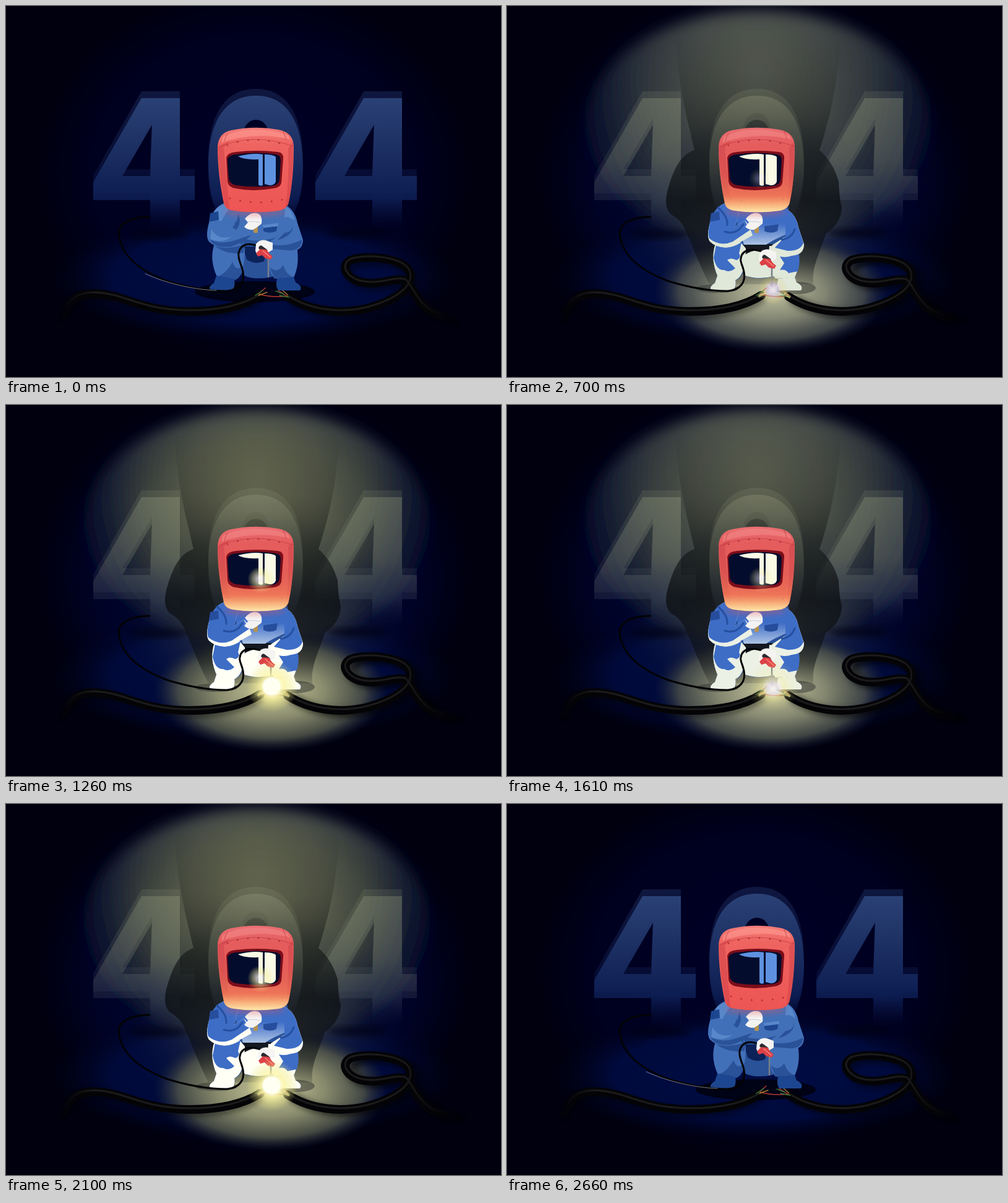
An HTML page for the animation above (3290 ms loop, 800 by 600 pixels).

```html
<!DOCTYPE html>
<html lang="en">
<head>
<meta charset="utf-8">
<title>404</title>
<style>
html, body { margin: 0; width: 100%; height: 100%; overflow: hidden; background: #00000f; }
svg { display: block; width: 100%; height: 100%; }
.line { fill: none; stroke-linecap: round; stroke-linejoin: round; }
.base { fill: #4270b8; }
.shade { fill: #2a5299; }
.pale { fill: #5887ca; }
.deep { fill: #0c2259; }
.boot { fill: #1d4690; }
.white { fill: var(--white); }
.blue { fill: #3e6dc6; }
</style>
</head>
<body>
<svg viewBox="0 0 800 600" role="img" aria-label="404">
<defs>
  <radialGradient id="room"><stop stop-color="#000027"/><stop offset=".75" stop-color="#00001f"/><stop offset="1" stop-color="#00000f"/></radialGradient>
  <radialGradient id="floor"><stop stop-color="#000c44"/><stop offset=".7" stop-color="#000a3c"/><stop offset="1" stop-color="#000520" stop-opacity="0"/></radialGradient>
  <radialGradient id="wall" gradientUnits="userSpaceOnUse" cx="0" cy="0" r="300" gradientTransform="translate(405 120) scale(1 1.2)"><stop stop-color="#5b5f54"/><stop offset=".35" stop-color="#464b48"/><stop offset=".6" stop-color="#2f363c"/><stop offset=".82" stop-color="#141c31"/><stop offset="1" stop-color="#030b2a" stop-opacity=".6"/></radialGradient>
  <radialGradient id="mid"><stop stop-color="#5a5e55" stop-opacity=".75"/><stop offset=".55" stop-color="#333a45" stop-opacity=".45"/><stop offset="1" stop-color="#0a1438" stop-opacity="0"/></radialGradient>
  <radialGradient id="pool"><stop stop-color="#c4c4a2"/><stop offset=".45" stop-color="#828572"/><stop offset=".78" stop-color="#474c4a" stop-opacity=".85"/><stop offset="1" stop-color="#141c34" stop-opacity="0"/></radialGradient>
  <radialGradient id="warm"><stop stop-color="#d8d690" stop-opacity=".3"/><stop offset=".7" stop-color="#8c8c40" stop-opacity=".15"/><stop offset="1" stop-color="#606020" stop-opacity="0"/></radialGradient>
  <radialGradient id="flare"><stop stop-color="#fff"/><stop offset=".3" stop-color="#fffde0"/><stop offset=".46" stop-color="#fcf6a4" stop-opacity=".75"/><stop offset="1" stop-color="#e9e27a" stop-opacity="0"/></radialGradient>
  <radialGradient id="ember"><stop stop-color="#fff"/><stop offset=".35" stop-color="#dccdf5" stop-opacity=".85"/><stop offset=".65" stop-color="#e6dc90" stop-opacity=".4"/><stop offset="1" stop-color="#d8d080" stop-opacity="0"/></radialGradient>
  <linearGradient id="front" gradientUnits="userSpaceOnUse" x1="0" y1="145" x2="0" y2="362"><stop stop-color="#2b4276"/><stop offset=".5" stop-color="#1a2d61" stop-opacity=".92"/><stop offset=".76" stop-color="#10245d" stop-opacity=".75"/><stop offset="1" stop-color="#06123e" stop-opacity="0"/></linearGradient>
  <linearGradient id="glow" gradientUnits="userSpaceOnUse" x1="0" y1="145" x2="0" y2="358"><stop stop-color="#a9ae8c" stop-opacity=".27"/><stop offset=".5" stop-color="#949b84" stop-opacity=".24"/><stop offset=".8" stop-color="#5a6678" stop-opacity=".2"/><stop offset="1" stop-color="#304070" stop-opacity="0"/></linearGradient>
  <linearGradient id="cast" gradientUnits="userSpaceOnUse" x1="0" y1="45" x2="0" y2="455"><stop stop-color="#10130f" stop-opacity="0"/><stop offset=".25" stop-color="#10130f" stop-opacity=".22"/><stop offset=".45" stop-color="#0b0e0e" stop-opacity=".5"/><stop offset=".65" stop-color="#0a0d10" stop-opacity=".75"/><stop offset=".9" stop-color="#0b0e12" stop-opacity=".5"/><stop offset="1" stop-color="#0b0e12" stop-opacity=".1"/></linearGradient>
  <linearGradient id="rubber" gradientUnits="userSpaceOnUse" x1="80" y1="0" x2="730" y2="0"><stop stop-color="#040407" stop-opacity="0"/><stop offset=".06" stop-color="#040407"/><stop offset=".92" stop-color="#040407"/><stop offset="1" stop-color="#040407" stop-opacity="0"/></linearGradient>
  <linearGradient id="sheen" gradientUnits="userSpaceOnUse" x1="95" y1="0" x2="710" y2="0"><stop stop-color="#1b1b1b" stop-opacity="0"/><stop offset=".08" stop-color="#1b1b1b"/><stop offset=".88" stop-color="#1b1b1b"/><stop offset="1" stop-color="#1b1b1b" stop-opacity="0"/></linearGradient>
  <linearGradient id="mask" x1="0" y1="0" x2="0" y2="1"><stop stop-color="#f47d7a"/><stop offset=".2" stop-color="#ee6460"/><stop offset="1" stop-color="#ed5553"/></linearGradient>
  <linearGradient id="chin" x1="0" y1="0" x2="0" y2="1"><stop stop-color="#b52a50" stop-opacity=".16"/><stop offset=".5" stop-color="#d05a50" stop-opacity=".25"/><stop offset=".8" stop-color="#ee8258" stop-opacity=".65"/><stop offset=".9" stop-color="#f8b67c" stop-opacity=".9"/><stop offset="1" stop-color="#ffeaac"/></linearGradient>
  <linearGradient id="torso" gradientUnits="userSpaceOnUse" x1="0" y1="352" x2="0" y2="390"><stop stop-color="#3e6dc6"/><stop offset="1" stop-color="#b9cce8"/></linearGradient>
  <filter id="soft" x="-30%" y="-30%" width="160%" height="160%"><feGaussianBlur stdDeviation="4"/></filter>
  <filter id="haze" x="-30%" y="-30%" width="160%" height="160%"><feGaussianBlur stdDeviation="11"/></filter>
  <path id="four" fill-rule="evenodd" d="M219 149H281V275H305V314H281V368H233V314H141V285ZM236 192L188 275H233Z"/>
  <path id="zero" fill-rule="evenodd" d="M404 145C457 145 480 192 480 260S457 372 404 372 327 328 327 260 351 145 404 145ZM404 184C384 184 377 210 377 260S384 333 404 333 431 310 431 260 424 184 404 184Z"/>
  <g id="digits"><use href="#four"/><use href="#zero"/><use href="#four" x="359"/></g>
  <path id="shell" d="M342 228C343 212 350 204 364 201Q402 193 440 200C456 203 464 211 465 226C465 260 463 290 457 317Q455 328 441 331Q402 336 368 331Q354 329 352 319C346 290 342 260 342 228Z"/>
  <path id="cord" d="M92 500C100 480 111 464 145 465C195 468 215 492 290 494C345 495 384 485 411 468"/>
  <path id="loop" d="M455 470C492 494 540 499 583 489C625 478 662 457 652 429C640 407 582 402 557 411C540 420 549 439 572 446C605 454 626 438 646 444C661 458 668 501 722 503"/>
  <path id="leftLeg" d="M337 384Q328 410 341 438L370 443Q386 435 386 392L374 378Z"/>
  <path id="rightLeg" d="M424 388L470 389Q475 418 465 439L434 441Q420 425 424 388Z"/>
  <path id="leftBoot" d="M340 436L369 441Q371 453 366 460H331Q325 455 336 448Z"/>
  <path id="rightBoot" d="M438 441L465 438L468 447Q480 453 475 460H440Q435 453 438 441Z"/>
  <path id="leftArm" d="M352 319Q337 325 330 344Q321 372 328 381Q341 394 364 389L397 371Q390 350 384 347L368 358L376 329Z"/>
  <path id="rightArm" d="M450 321Q467 329 471 351L480 378Q480 393 466 396Q450 400 431 393L428 380Q444 370 450 366Z"/>
</defs>

<rect width="800" height="600" fill="#00000f"/>
<ellipse cx="400" cy="270" rx="350" ry="300" fill="url(#room)"/>
<ellipse cx="400" cy="438" rx="325" ry="105" fill="url(#floor)"/>

<g class="lit">
  <ellipse cx="404" cy="290" rx="340" ry="270" fill="url(#floor)" opacity=".35"/>
  <ellipse cx="406" cy="195" rx="278" ry="188" fill="url(#wall)" filter="url(#haze)"/>
  <ellipse cx="412" cy="350" rx="225" ry="175" fill="url(#mid)"/>
  <ellipse cx="428" cy="462" rx="192" ry="99" fill="url(#pool)"/>
  <g class="warm">
    <ellipse cx="408" cy="175" rx="250" ry="172" fill="url(#warm)"/>
    <ellipse cx="430" cy="462" rx="185" ry="97" fill="url(#warm)"/>
  </g>
</g>

<g fill="#000008" opacity=".55" filter="url(#soft)">
  <ellipse cx="248" cy="369" rx="46" ry="7"/>
  <ellipse cx="567" cy="367" rx="46" ry="7"/>
</g>
<g class="dark" fill="url(#front)">
  <use href="#digits" y="-11" opacity=".36"/>
  <use href="#digits"/>
</g>
<g class="lit">
  <g fill="url(#glow)">
    <use href="#digits" y="-11" opacity=".5"/>
    <use href="#digits"/>
  </g>
  <path fill="url(#cast)" d="M272 45C276 130 292 185 303 233C278 241 267 270 259 300Q253 326 265 337Q285 348 291 369C303 395 313 423 327 450H495C492 421 506 399 515 369Q541 351 541 325Q537 310 536 284Q527 252 505 233C523 180 535 120 540 45Z"/>
  <g fill="url(#glow)" opacity=".45"><use href="#zero"/><use href="#zero" y="-11" opacity=".5"/></g>
</g>

<ellipse class="dark" cx="402" cy="462" rx="97" ry="17" fill="#00000d" opacity=".85"/>
<g class="lit" fill="#14171c" opacity=".6"><ellipse cx="468" cy="456" rx="31" ry="10" opacity=".65"/><ellipse cx="340" cy="457" rx="34" ry="7" opacity=".55"/></g>

<!-- heavy cable -->
<g class="line" stroke="#00000a" stroke-opacity=".4" stroke-width="12" filter="url(#soft)">
  <use href="#cord" y="7"/><use href="#loop" x="6" y="7"/>
  <use class="lit" href="#loop" x="16" y="4"/>
</g>
<g class="line" stroke="url(#rubber)" stroke-width="14"><use href="#cord"/><use href="#loop"/></g>
<g class="line" stroke="url(#sheen)" stroke-width="3"><use href="#cord" y="-2"/><use href="#loop" y="-2"/></g>
<g class="line" stroke-width="1.5">
  <path stroke="#b73832" d="M409 466Q430 472 455 469M410 464L419 456M452 468L440 460"/>
  <path stroke="#387a3b" d="M403 468L415 460M457 471L442 468M449 466L436 461"/>
  <path stroke="#a87936" d="M408 468L422 463M455 467L447 460"/>
</g>

<!-- worker, unlit -->
<g>
  <path class="shade" d="M350 322H454L462 366 430 438Q402 444 385 436L350 385Z"/>
  <path class="deep" d="M382 387H424L417 413Q402 419 389 410Z"/>
  <use class="base" href="#leftLeg"/><use class="base" href="#rightLeg"/>
  <path class="shade" d="M341 438Q357 432 366 414Q372 432 385 418Q381 440 370 443ZM465 439Q452 434 448 419Q438 434 426 422L434 441ZM337 388Q358 395 386 385L384 399Q359 404 337 388Z"/>
  <use class="boot" href="#leftBoot"/><use class="boot" href="#rightBoot"/>
  <path class="base" d="M360 322H450L454 368Q428 379 419 386H383L372 350Z"/>
  <path class="shade" d="M378 372Q397 386 438 374L421 389H386Z"/>
  <use class="base" href="#leftArm"/>
  <path class="pale" d="M351 321Q334 328 333 344L348 348Q358 330 365 323ZM332 361Q342 379 365 373Q349 385 330 377Z"/>
  <path class="shade" d="M329 377Q345 386 367 380L397 370Q386 382 364 389Q337 393 329 377ZM366 358Q375 349 375 336Q382 350 372 362Z"/>
  <path class="boot" d="M330 335L343 332L344 346L328 349Z"/>
  <path class="boot" d="M416 355L439 353L437 364Q426 369 416 364Z"/>
  <path class="pale" d="M415 354L440 351V356L416 359Z"/>
</g>
<g class="arm">
  <use class="base" href="#rightArm"/>
  <path class="shade" d="M478 382Q474 397 454 395L431 393L429 386Q455 390 478 378ZM450 367Q462 366 464 355Q464 372 438 379Z"/>
  <path class="pale" d="M451 323Q464 331 466 347Q456 339 450 342Z"/>
</g>

<!-- worker, lit -->
<g class="lit">
  <path class="white" d="M382 389H427L431 437Q405 444 382 435Z"/>
  <path d="M382 385H431L424 400Q402 389 384 403Z" fill="#141821"/>
  <use class="white" href="#leftLeg"/><use class="white" href="#rightLeg"/>
  <use class="white" href="#leftBoot"/><use class="white" href="#rightBoot"/>
  <path class="blue" d="M338 386Q356 397 379 382L375 400Q380 407 371 411Q361 406 356 411L369 424Q360 432 351 427Q338 428 334 407ZM441 405Q457 409 471 397Q475 413 470 429L455 432Q450 425 441 427L448 416Z"/>
  <path fill="url(#torso)" d="M360 322H450L454 368Q428 379 419 386H383L372 350Z"/>
  <use class="white" href="#leftArm"/>
  <path class="blue" d="M352 319Q336 325 330 344Q323 366 327 376Q345 390 365 381L393 362L384 347L368 358L376 329Z"/>
  <path d="M341 326Q357 340 356 354M352 365Q371 371 382 353" class="line" stroke="#2650a0" stroke-width="3"/>
  <path d="M330 335L343 332L344 346L328 349ZM416 356L439 353L437 364Q426 369 416 364Z" fill="#274e9d"/>
  <g class="arm">
    <use class="white" href="#rightArm"/>
    <path class="blue" d="M450 321Q467 329 471 351L479 376Q475 389 454 389L433 384Q444 371 450 366Z"/>
    <path class="line" stroke="#2650a0" stroke-width="3" d="M444 371Q460 369 465 354"/>
  </g>
</g>

<!-- glove and tie -->
<rect x="400" y="355" width="7" height="12" rx="2" fill="#b5924f"/>
<path fill="#f4f3f2" d="M386 344Q395 333 405 335Q415 337 413 352Q406 358 399 362Q389 362 385 357L391 350Z"/>
<path class="line" stroke="#c9ced9" stroke-width="1" d="M391 349Q401 347 410 350"/>
<ellipse cx="402" cy="333" rx="49" ry="7" fill="#e4525a" opacity=".35" filter="url(#soft)"/>

<!-- helmet -->
<use href="#shell" fill="url(#mask)"/>
<path fill="#cf4048" d="M342 229Q351 222 362 218L352 229 361 330 354 324Q345 280 342 229ZM456 230L464 220Q465 278 457 317L451 329Q458 286 456 230Z" opacity=".5"/>
<path fill="#ff9a91" opacity=".6" d="M350 212Q372 200 402 200T456 209L459 216Q405 202 348 221Z"/>
<g class="line" stroke="#b7333b">
  <path stroke-width="1" d="M343 228Q400 204 465 227M358 207Q354 212 353 219M448 203L453 216" opacity=".65"/>
  <path stroke-width="3" stroke-dasharray="0 17" d="M358 225Q402 208 454 225M362 311Q402 323 447 313"/>
</g>
<use class="lit" href="#shell" fill="url(#chin)"/>
<path fill="#7b0d1a" d="M356 245Q358 237 372 236Q405 232 439 236Q449 237 448 247L445 286Q443 294 432 295Q399 301 371 295Q359 293 358 284Z"/>
<path fill="#030c2c" d="M358 249Q359 241 373 240Q405 235 436 240Q444 241 444 249L442 281Q441 289 430 291Q399 294 373 290Q361 288 360 279Z"/>
<g id="shine">
  <path d="M375 243Q400 237 415 240V290Q411 292 408 289V248Q383 249 375 243Z"/>
  <path d="M418 240Q431 240 436 244V284Q434 290 426 290L418 288Z"/>
</g>
<g class="lit"><circle class="warm" cx="412" cy="283" r="22" fill="url(#flare)" opacity=".6"/><circle cx="408" cy="279" r="17" fill="url(#ember)" opacity=".3"/></g>

<!-- thin lead and torch -->
<path id="lead" class="line" stroke="#030305" stroke-width="3"/>
<path class="line dark" stroke="#a8acb8" stroke-width=".7" d="M225 433C260 449 305 459 340 460"/>
<g id="hand">
  <path class="line" stroke="#777d88" stroke-width="2.5" d="M424 408V438"/>
  <path fill="#f5f4f2" d="M404 385Q410 377 420 379L431 383V394Q422 400 415 402Q406 405 403 396Z"/>
  <path class="line" stroke="#2b2b31" stroke-width="7" d="M412 391L419 396"/>
  <path fill="#dc4145" d="M411 393L421 394 426 401 431 405 428 410 419 408 414 403 407 405 404 400Z"/>
  <path class="line" stroke="#ff8983" stroke-width="1.4" d="M415 396L427 406"/>
</g>

<!-- arc -->
<g class="lit">
  <circle cx="430" cy="459" r="25" fill="url(#ember)" opacity=".75"/>
  <path class="line" stroke="#e8dbff" stroke-width="1" d="M429 460L421 450M430 460L440 449M428 461L416 466M432 461L445 468"/>
  <path class="line" stroke="#efe392" stroke-width="5" d="M408 469L416 464M450 466L456 470" opacity=".55"/>
  <g class="warm">
    <circle cx="430" cy="455" r="42" fill="url(#flare)"/>
    <circle cx="429" cy="455" r="14" fill="#fffff2"/>
  </g>
</g>
</svg>
<script>
const STEP = 70, LOOP = 3290;
const all = s => document.querySelectorAll(s);
const clamp = x => Math.min(1, Math.max(0, x));
const lerp = (a, b, u) => a + (b - a) * u;
const lits = all('.lit'), darks = all('.dark'), warms = all('.warm'), arms = all('.arm');
const hand = document.getElementById('hand');
const lead = document.getElementById('lead');
const shine = document.getElementById('shine');
const base = new Map([...lits, ...darks, ...warms].map(e => [e, +(e.getAttribute('opacity') || 1)]));
const fade = (list, v) => list.forEach(e => e.setAttribute('opacity', base.get(e) * v));
const tint = (...rgb) => `rgb(${rgb})`;

// One long dip of the arc, then three short ones
function power(k) {
  const long = k < 10 ? (10 - k) / 4 : (k - 10) / 3;
  const short = Math.min(...[16, 22, 28].map(c => {
    const d = Math.abs(k - c);
    return d > 1 ? 1 : d * .4;
  }));
  return Math.min(clamp(long), short);
}

function leadPath(p) {
  const y = 9 * p;
  return `M232 341C204 341 182 351 182 367C185 410 229 433 261 445
    C300 457 332 461 357 461C378 459 386 446 383 430
    C381 419 ${lerp(374, 376, p)} ${409 + y / 2} ${lerp(376, 378, p)} ${399 + y}
    C380 ${383 + y} ${lerp(394, 399, p)} ${383 + y} ${lerp(409, 414, p)} ${389 + y}`;
}

function draw(now) {
  const k = Math.floor(now % LOOP / STEP);
  const u = clamp(k < 20 ? k / 4 : (38 - k) / 4);
  const p = u * u * (3 - 2 * u);
  const lit = +(k >= 6 && k < 35);
  const s = power(k);
  fade(lits, lit);
  fade(darks, 1 - lit);
  fade(warms, s);
  arms.forEach(e => e.setAttribute('transform', `translate(0 ${7 * p})`));
  hand.setAttribute('transform', `translate(${4 * p} ${15 * p})`);
  lead.setAttribute('d', leadPath(p));
  document.body.style.setProperty('--white', tint(lerp(224, 255, s), lerp(232, 255, s), lerp(217, 246, s)));
  shine.setAttribute('fill', lit ? tint(249, 249, 229) : tint(94, 146, 224));
  requestAnimationFrame(draw);
}
draw(performance.now());
</script>
</body>
</html>
```
